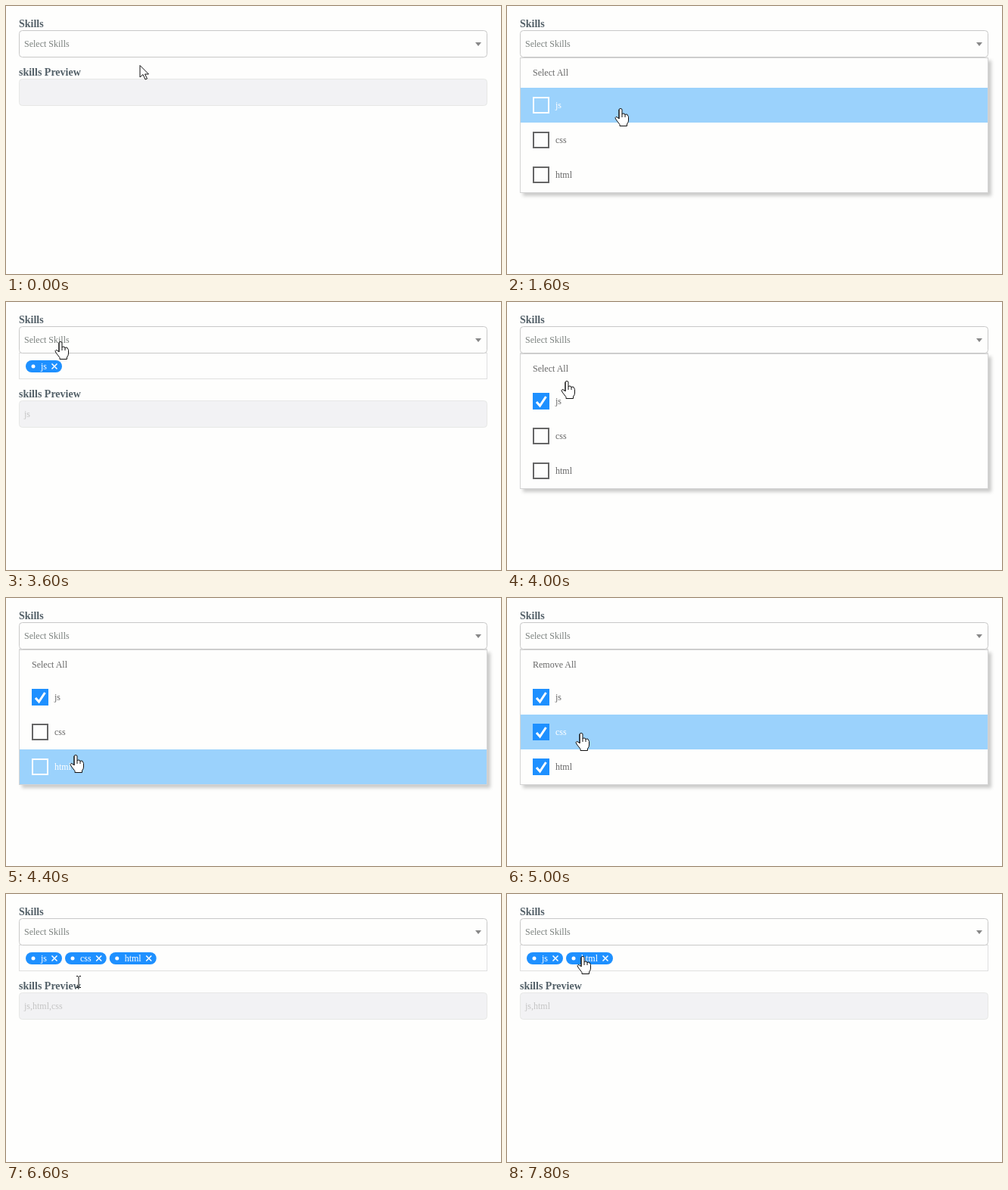
These frames come from a looping animation (654x354 px, 8 s). An HTML page:

```html
<!DOCTYPE html>
<html lang="en">
<head>
<meta charset="utf-8">
<title>Skills select</title>
<style>
  html, body { margin: 0; width: 100%; height: 100%; overflow: hidden; background: #fefefd; }
  svg { display: block; font: 12px "Liberation Serif", serif; fill: #666; }
  .label { font-weight: bold; font-size: 14px; fill: #536068; }
  .menu { filter: drop-shadow(4px 4px 2px #0003); }
  .cursor { fill: #fff; stroke: #111; stroke-linejoin: round; }
</style>
</head>
<body>
<svg id="stage" width="654" height="354" viewBox="0 0 654 354"></svg>
<script>
const LOOP = 8000, STEP = 200;
const BLUE = '#1e90ff';
const stage = document.getElementById('stage');

// Cursor keys: time, x, y, shape used from that time on
const path = [
  [0, 177, 78, 'arrow'], [200, 168, 62, 'hand'], [400, 161, 52, 'hand'],
  [800, 159, 56, 'hand'], [1200, 153, 110, 'hand'], [1600, 150, 135, 'hand'],
  [1800, 150, 135, 'hand'], [2200, 138, 220, 'hand'], [2400, 124, 293, 'arrow'],
  [2600, 120, 294, 'arrow'], [3200, 86, 122, 'arrow'], [3400, 76, 64, 'hand'],
  [3600, 72, 52, 'hand'], [3800, 72, 52, 'hand'], [4400, 92, 207, 'hand'],
  [4600, 94, 208, 'hand'], [4800, 97, 182, 'hand'], [5000, 98, 178, 'hand'],
  [5600, 102, 230, 'hand'], [6000, 106, 262, 'arrow'], [6200, 106, 262, 'arrow'],
  [6600, 96, 116, 'beam'], [6800, 101, 112, 'beam'], [7000, 106, 99, 'hand'],
  [7200, 108, 95, 'hand'], [7400, 100, 82, 'hand'], [LOOP, 100, 82, 'hand']
];
const openSpans = [[600, 2800], [3800, 6400]];
// Selections in the order they were made
const picks = [[0, []], [1800, ['js']], [4600, ['js', 'html']],
  [5000, ['js', 'html', 'css']], [7800, ['js', 'html']]];
const skills = [['js', 8], ['css', 14.7], ['html', 22]];

const cursors = {
  arrow: '<path d="M0 .5V16L4 12.5L7 19L9.5 18L6.5 12H11.5Z"/>',
  hand: '<path d="M-2 2Q-2 .5 0 .5Q2 .5 2 2V8Q2 7 4 7Q6 7 6 9Q6 8 8 8Q9.5 8 9.5 10Q10.5 10 10.5 11.5V16Q10.5 19 8.5 21V23.5H-1V21.5L-6 15Q-8 12 -6 11.5Q-4 11.5 -2 14ZM-2 14V2M2 8V12M6 9V12"/>',
  beam: '<path fill="none" d="M-3 -7.5H-1L0 -6.5L1 -7.5H3M0 -6.5V6.5M-3 7.5H-1L0 6.5L1 7.5H3"/>'
};

const text = (x, y, value, attrs = '') => `<text x="${x}" y="${y}" ${attrs}>${value}</text>`;
const box = (x, y, w, h, attrs) => `<rect x="${x}" y="${y}" width="${w}" height="${h}" ${attrs}/>`;
const latest = (list, t) => list.filter(item => item[0] <= t).pop();

function cursorAt(t) {
  const from = latest(path, t);
  const to = path[path.indexOf(from) + 1];
  const k = (t - from[0]) / (to[0] - from[0]);
  const mix = i => Math.round(from[i] + (to[i] - from[i]) * k);
  return { x: mix(1), y: mix(2), shape: from[3] };
}

function chips(chosen) {
  let x = 26;
  return skills.filter(([name]) => chosen.includes(name)).map(([name, width]) => {
    const left = x, cross = x + width + 30;
    x += width + 44;
    return box(left, 77, width + 40, 16, `rx="8" fill="${BLUE}"`) +
      `<circle cx="${left + 10}" cy="85" r="2.5" fill="#fff"/>` +
      text(left + 20, 89, name, 'fill="#fff"') +
      `<path d="M${cross - 3.5} 81.5l7 7m0-7l-7 7" stroke="#fff" stroke-width="1.5"/>`;
  }).join('');
}

function option(name, index, checked, cursor) {
  const top = 108 + index * 46;
  const hover = cursor.shape === 'hand' && cursor.y >= top && cursor.y < top + 46;
  const ink = hover ? '#fff' : '#666';
  const check = checked
    ? box(34, top + 12, 22, 22, `fill="${BLUE}"`) +
      `<path d="M39 ${top + 24}l4.5 5l8-12" fill="none" stroke="#fff" stroke-width="3"/>`
    : box(35, top + 13, 20, 20, `fill="none" stroke="${ink}" stroke-width="2"`);
  return (hover ? box(18, top, 617, 46, 'fill="#9bd2fc"') : '') + check +
    text(64, top + 27, name, `fill="${ink}"`);
}

function menu(chosen, cursor) {
  const title = chosen.length === skills.length ? 'Remove All' : 'Select All';
  return box(17.5, 68.5, 618, 178, 'class="menu" fill="#fefefd" stroke="#d4d4d4"') +
    text(34, 92, title) +
    skills.map(([name], i) => option(name, i, chosen.includes(name), cursor)).join('');
}

function draw(t) {
  const cursor = cursorAt(t);
  const chosen = latest(picks, t)[1];
  const open = openSpans.some(([start, end]) => t >= start && t < end);
  const shift = chosen.length ? 34 : 0;
  stage.innerHTML =
    text(17, 28, 'Skills', 'class="label"') +
    (shift ? box(17.5, 67.5, 618, 34, 'fill="none" stroke="#e0e0e0"') + chips(chosen) : '') +
    box(17.5, 32.5, 618, 35, 'rx="4" fill="#fefefd" stroke="#c8c8c8"') +
    text(24, 54, 'Select Skills', 'fill="#7b817e"') +
    '<path d="M620 48h8l-4 5z" fill="#888"/>' +
    text(17, 92 + shift, 'skills Preview', 'class="label"') +
    box(17.5, 96.5 + shift, 618, 35, 'rx="4" fill="#f2f2f4" stroke="#e7e8e6"') +
    text(24, 152, chosen.join(), 'fill="#c4c4c4"') +
    (open ? menu(chosen, cursor) : '') +
    `<g class="cursor" transform="translate(${cursor.x} ${cursor.y})">${cursors[cursor.shape]}</g>`;
}

let shown = -1;
const start = performance.now();
function frame() {
  const t = Math.floor((performance.now() - start) % LOOP / STEP) * STEP;
  if (t !== shown) draw(shown = t);
  requestAnimationFrame(frame);
}
frame();
</script>
</body>
</html>
```
